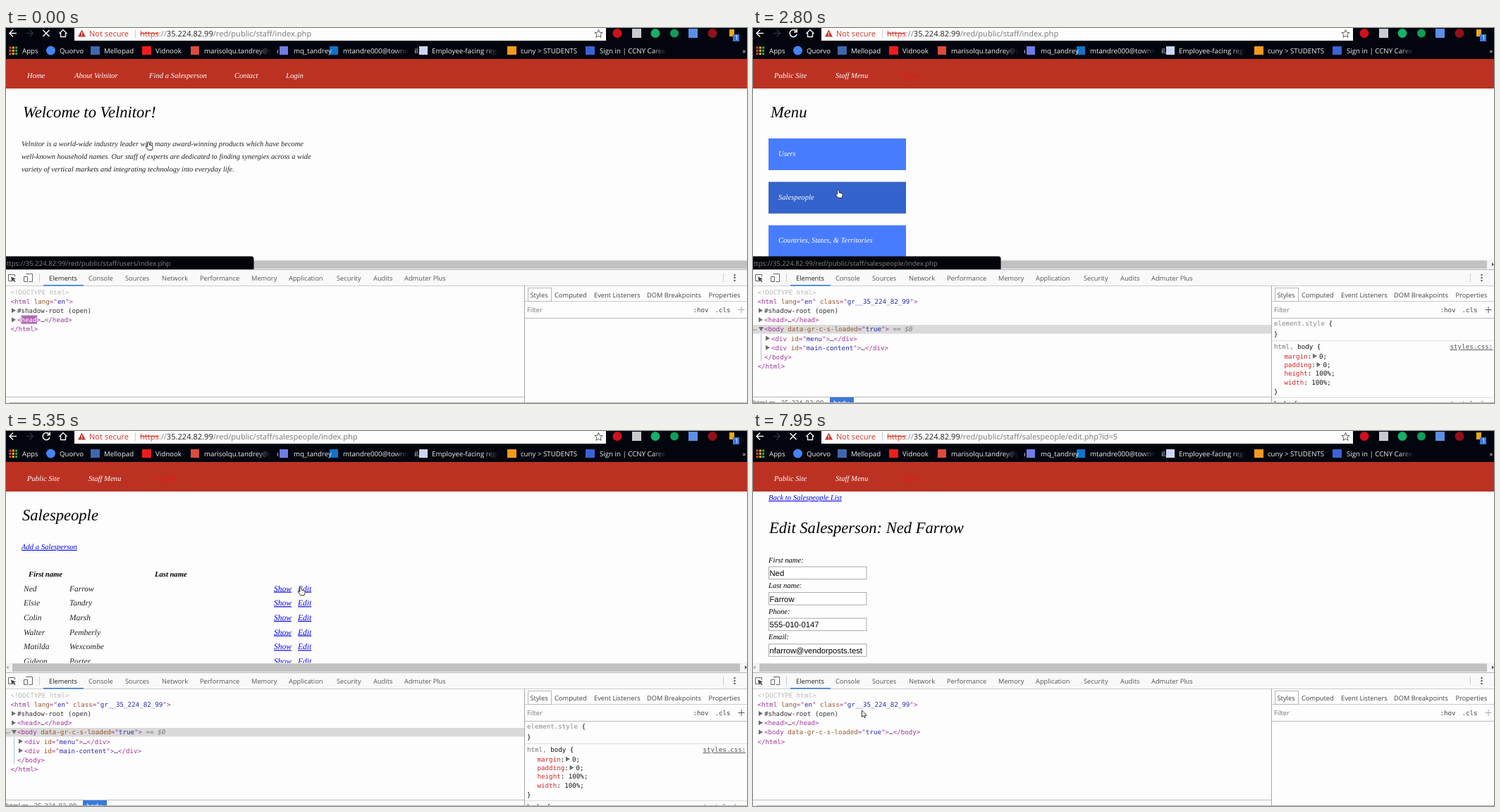
These frames come from a looping animation (1051x533 px, 8 s). An HTML page:

```html
<!DOCTYPE html>
<html lang="en">
<head>
<meta charset="utf-8">
<title>Staff menu walkthrough</title>
<style>
html, body { margin: 0; width: 100%; height: 100%; overflow: hidden; background: #fdfdfd; }
svg { display: block; width: 1051px; height: 533px; }
text { white-space: pre; text-rendering: geometricPrecision; }
.s { font: italic 10.6px "Liberation Serif", serif; }
.p { font-size: 10.4px; }
.r { font-size: 11.5px; }
.b { font-weight: bold; }
.h { font: italic 22.6px "Liberation Serif", serif; }
.w { fill: #fff; }
.l { fill: #00e; text-decoration: underline; }
.u { font: 9.3px "Open Sans", "Noto Sans", sans-serif; }
.k { font: 9.7px "Open Sans", "Noto Sans", sans-serif; fill: #f1f1f1; }
.a { font: 11.1px "Open Sans", "Noto Sans", sans-serif; }
.m { font: 9.2px "DejaVu Sans Mono", monospace; }
.i { font: 11.25px "Liberation Sans", Arial, sans-serif; }
</style>
</head>
<body>
<script>
const NS = 'http://www.w3.org/2000/svg';
function el(tag, attrs, parent) {
  const e = document.createElementNS(NS, tag);
  for (const k in attrs) e.setAttribute(k, attrs[k]);
  parent.appendChild(e);
  return e;
}
const svg = el('svg', { viewBox: '0 0 1051 533', width: 1051, height: 533 }, document.body);
const group = parent => el('g', {}, parent);
const rect = (g, x, y, width, height, fill, more) => el('rect', { x, y, width, height, fill, ...more }, g);
const dot = (g, cx, cy, r, fill) => el('circle', { cx, cy, r, fill }, g);
const path = (g, d, stroke, more) => el('path', { d, stroke, fill: 'none', ...more }, g);
function text(g, x, y, str, cls, fill) {
  const e = el('text', { x, y, class: cls }, g);
  if (fill) e.setAttribute('fill', fill);
  e.textContent = str;
  return e;
}
// The first letter of each part selects its colour.
const inks = { p: '#a0379c', o: '#9a5a2b', b: '#2a2ab0', g: '#b8b8b8', d: '#333', n: '#777',
  r: '#d3262b', w: '#fff', q: '#888', k: '#111' };
function rich(g, x, y, str, cls = 'm') {
  const e = text(g, x, y, '', cls);
  e.textContent = '';
  for (const part of str.split('|'))
    el('tspan', { fill: inks[part[0]] }, e).textContent = part.slice(1);
  return e;
}
const show = (e, on) => e.setAttribute('display', on ? 'inline' : 'none');
const at = (list, t) => list.reduce((v, [start, val]) => t >= start ? val : v, list[0][1]);

// Page views
rect(svg, 0, 0, 1051, 533, '#fdfdfd');
const page = group(svg);
rect(page, 0, 44, 1051, 42, '#bb3223');
const views = {};
for (const name of ['home', 'menu', 'list', 'edit']) views[name] = group(page);
const staffNav = group(page);

const home = views.home;
[[30, 'Home'], [97, 'About Velnitor'], [203, 'Find a Salesperson'], [324, 'Contact'], [397, 'Login']]
  .forEach(([x, s]) => text(home, x, 71, s, 's w'));
text(home, 24, 127, 'Welcome to Velnitor!', 'h');
['Velnitor is a world-wide industry leader with many award-winning products which have become',
  'well-known household names. Our staff of experts are dedicated to finding synergies across a wide',
  'variety of vertical markets and integrating technology into everyday life.']
  .forEach((s, i) => text(home, 22, 168 + 18 * i, s, 's p', '#222'));

text(staffNav, 30, 71, 'Public Site', 's w');
text(staffNav, 117, 71, 'Staff Menu', 's w');
const logout = text(staffNav, 210, 71, 'Logout', 's', '#ee1414');

text(views.menu, 25, 127, 'Menu', 'h');
const buttons = ['Users', 'Salespeople', 'Countries, States, & Territories'].map((s, i) => {
  const y = 157 + 61.7 * i, b = rect(views.menu, 22, y, 195, 45, '#487cff');
  text(views.menu, 36, y + 25, s, 's w');
  return b;
});

const list = views.list;
text(list, 23, 127, 'Salespeople', 'h');
text(list, 22, 168, 'Add a Salesperson', 's l');
text(list, 32, 206.5, 'First name', 's b');
text(list, 211, 206.5, 'Last name', 's b');
['Ned Farrow', 'Elsie Tandry', 'Colin Marsh', 'Walter Pemberly', 'Matilda Wexcombe', 'Gideon Porter']
  .forEach((s, i) => {
    const y = 227.5 + 20.7 * i, [first, last] = s.split(' ');
    text(list, 25, y, first, 's r', '#222');
    text(list, 90, y, last, 's r', '#222');
    text(list, 380, y, 'Show', 's r l');
    text(list, 414, y, 'Edit', 's r l');
  });

const edit = views.edit;
text(edit, 22, 98, 'Back to Salespeople List', 's l');
text(edit, 23, 145, 'Edit Salesperson: Ned Farrow', 'h');
[['First name:', 'Ned'], ['Last name:', 'Farrow'], ['Phone:', '555-010-0147'],
  ['Email:', 'nfarrow@vendorposts.test']].forEach(([label, val], i) => {
  const y = 36.6 * i;
  text(edit, 22, 186.5 + y, label, 's');
  rect(edit, 22.5, 193 + y, 138.5, 17.5, '#fff', { stroke: '#a9a9a9' });
  text(edit, 23.5, 206 + y, val, 'i');
});

// Horizontal scrollbar
rect(svg, 0, 329.5, 1051, 13.5, '#f4f4f4');
const thumb = rect(svg, 9, 330.5, 1032, 11.5, '#c1c1c1');
path(svg, 'M3.5 333.5v5l-3-2.5z', 'none', { fill: '#a3a3a3' });
const rightArrow = path(svg, 'M1048 333.5v5l3-2.5z', 'none', { fill: '#505050' });

// Browser frame
const bar = group(svg);
rect(bar, 0, 0, 1051, 44, '#02050d');
rect(bar, 97, 0, 754, 18, '#fdfdfd');
const white = { 'stroke-width': 1.6 };
path(bar, 'M15 7.5H5.5M10 2.5l-5 5 5 5', '#eee', white);
path(bar, 'M28.5 7.5H38M33.5 2.5l5 5-5 5', '#2b2e36', white);
const stopIcon = path(bar, 'M52.5 3l9 9M61.5 3l-9 9', '#f5f5f5', white);
const reloadIcon = path(bar, 'M61.5 5A5 5 0 1 0 62 9M62.2 1.5V5.7H58', '#f5f5f5', white);
path(bar, 'M75.5 8l5.5-5.5L86.500 8M77.500 7v5.5h7V7', '#f5f5f5', { 'stroke-width': 1.4 });
path(bar, 'M107.500 2.500l5.5 10h-11z', 'none', { fill: '#c9362b' });
path(bar, 'M107.500 6v3.500M107.500 10.200v1.300', '#fff', { 'stroke-width': 1.1 });
text(bar, 118, 11.5, 'Not secure', 'a', '#c9362b');
rect(bar, 183, 2, 1, 12, '#ccc');
const addr = text(bar, 190, 11.5, '', 'a');
const scheme = el('tspan', { fill: '#d23f31', 'text-decoration': 'line-through' }, addr);
scheme.textContent = 'https';
el('tspan', { fill: '#888' }, addr).textContent = '://';
el('tspan', { fill: '#222' }, addr).textContent = '35.224.82.99';
const addrPath = el('tspan', { fill: '#777' }, addr);
path(bar, 'M840.500 2.500l1.600 3.700 4 .4-3 2.700.9 4-3.500-2.100-3.500 2.100.9-4-3-2.700 4-.4z', '#555');

dot(bar, 867, 7.5, 6.5, '#d0101f');
rect(bar, 888, 1, 13, 13, '#c9cbd0');
dot(bar, 921, 7.5, 6.5, '#15b06a');
dot(bar, 948, 7.5, 6, '#0f9d58');
rect(bar, 968, 1, 13, 13, '#5b8fe8');
dot(bar, 1002, 7.5, 6.5, '#93101a');
rect(bar, 1026, 2, 7, 10, '#e8a81c');
rect(bar, 1031, 9, 9, 10, '#3a78e0');
text(bar, 1033.5, 17, '1', 'u', '#fff').setAttribute('font-size', 8);

const appInks = ['#ea4335', '#fbbc05', '#34a853', '#4285f4'];
for (let i = 0; i < 9; i++)
  rect(bar, 4.5 + i % 3 * 4.3, 26.5 + (i / 3 | 0) * 4.3, 3, 3, appInks[(i + (i / 3 | 0)) % 4]);
dot(bar, 63.5, 32, 6.5, '#4285f4');
[[120, 13, '#3f66b0'], [193, 13, '#f01c1c'], [262, 12, '#dd4b3e'], [388, 12, '#6f7be8'], [459, 12, '#1173c9'],
  [586, 12, '#c9d7f2'], [711, 13, '#f59a1b'], [822, 13, '#3b62d6']]
  .forEach(([x, w, c]) => rect(bar, x, 26, w, 12, c));
[[23, 'Apps'], [76, 'Quorvo'], [139, 'Mellopad'], [212, 'Vidnook'], [281, 'marisolqu.tandrey@gm'], [408, 'mq_tandrey'],
  [478, 'mtandre000@townmail.'], [604, 'Employee-facing regi'], [730, 'cuny > STUDENTS'],
  [842, 'Sign in | CCNY Career'], [1044.5, '»']].forEach(([x, s]) => text(bar, x, 35.5, s, 'k'));
const fade = el('linearGradient', { id: 'fade' }, el('defs', {}, svg));
[0, 1].forEach(o => el('stop', { offset: o, 'stop-color': '#02050d', 'stop-opacity': o }, fade));
[376, 571, 698, 937].forEach(x => {
  rect(bar, x - 20, 22, 20, 21, 'url(#fade)');
  rect(bar, x, 22, 9, 21, '#02050d');
});

// Developer tools
const tools = group(svg);
rect(tools, 0, 343, 1051, 190, '#fdfdfd');
rect(tools, 0, 343, 1051, 23, '#f9f9f9');
rect(tools, 0, 343, 1051, 1, '#b5b5b5');
rect(tools, 0, 366, 1051, 1, '#ccc');
path(tools, 'M8 359.500H3.500V350.500h9v3', '#666');
path(tools, 'M7 353.500l7 3-3 1 2.500 2.500-1.200 1.200-2.500-2.500-1.300 2.300z', 'none', { fill: '#444' });
path(tools, 'M28.500 349.500h9v11h-5M25.500 353.500h5v7h-5z', '#666');
rect(tools, 47, 349, 1, 12, '#ccc');
rect(tools, 1017, 349, 1, 12, '#ccc');
[351, 355, 359].forEach(y => dot(tools, 1033.5, y, 1.2, '#555'));
[[61, 'Elements'], [117, 'Console'], [169, 'Sources'], [221, 'Network'], [275, 'Performance'], [348, 'Memory'],
  [401, 'Application'], [469, 'Security'], [521, 'Audits'], [565, 'Admuter Plus']]
  .forEach(([x, s], i) => text(tools, x, 358.8, s, 'u', i ? '#555' : '#222'));
rect(tools, 53, 365, 57, 1.6, '#3b7de0');
rect(tools, 0, 524, 735, 1, '#bbb');
rect(tools, 735, 366, 1, 167, '#a5a5a5');
rect(tools, 736, 388, 315, 1, '#ccc');
rect(tools, 740.5, 369.5, 33, 19, '#fff', { stroke: '#b5b5b5' });
[[743.5, 'Styles'], [778, 'Computed'], [834, 'Event Listeners'], [909, 'DOM Breakpoints'], [996.5, 'Properties']]
  .forEach(([x, s]) => text(tools, x, 382.7, s, 'u', '#444'));
text(tools, 739, 404, 'Filter', 'u', '#777');
text(tools, 974.5, 403.5, ':hov', 'm b', '#444');
text(tools, 1005.5, 403.5, '.cls', 'm b', '#444');
const plus = path(tools, 'M1038.500 400.500h9M1043 396v9', '#aaa');
rect(tools, 736, 412, 315, 1, '#bbb');

// Element tree
const tree = {};
for (const name of ['loadHi', 'load', 'closed', 'open']) tree[name] = group(tools);
const tri = (g, x, y) => path(g, `M${x} ${y - 3.5}v7l6-3.5z`, 'none', { fill: '#6e6e6e' });
const triDown = (g, x, y) => path(g, `M${x} ${y - 3}h7l-3.500 6z`, 'none', { fill: '#6e6e6e' });
const row = i => 378.8 + 13.15 * i;
const line = (g, i, x, str) => rich(g, x, row(i), str);
const bodyTag = 'p<body |odata-gr-c-s-loaded|p="|btrue|p">';
for (const name in tree) {
  const g = tree[name], loading = name.startsWith('load'), hot = name === 'loadHi';
  if (name === 'open') rect(g, 0, 422, 735, 12.5, '#dadada');
  line(g, 0, 6.5, 'g<!DOCTYPE html>');
  line(g, 1, 6.5, 'p<html |olang|p="|ben|p"' + (loading ? '>' : ' |oclass|p="|bgr__35_224_82_99|p">'));
  tri(g, 8, row(2) - 3.5);
  line(g, 2, 16, 'd#shadow-root (open)');
  tri(g, 8, row(3) - 3.5);
  if (hot) rect(g, 21.500, 408.5, 22.500, 12, '#b067b5');
  line(g, 3, 16, `p<|${hot ? 'w' : 'p'}head|p>|d…|p</head>`);
  if (loading) line(g, 4, 6.5, 'p</html>');
  else if (name === 'closed') {
    tri(g, 8, row(4) - 3.5);
    line(g, 4, 16, bodyTag + '|d…|p</body>');
    line(g, 5, 6.5, 'p</html>');
  }
}
const open = tree.open;
dot(open, 1.5, 429, .8, '#666');
dot(open, 4.5, 429, .8, '#666');
triDown(open, 8, row(4) - 3.5);
line(open, 4, 16, bodyTag + '|n == ').appendChild(el('tspan', { fill: '#777', 'font-style': 'italic' }, open)).textContent = '$0';
rect(open, 11, 435, 1, 38, '#a9c3dd');
['menu', 'main-content'].forEach((id, i) => {
  tri(open, 18, row(5 + i) - 3.5);
  line(open, 5 + i, 26, `p<div |oid|p="|b${id}|p">|d…|p</div>`);
});
line(open, 7, 16, 'p</body>');
line(open, 8, 6.5, 'p</html>');
text(open, 0, 535.5, 'html.gr__35_224_82_99', 'u', '#444');
rect(open, 109, 525, 34, 8, '#3879d9');
text(open, 114, 535.5, 'body', 'u', '#fff');

// Style rules
rich(open, 739, 423, 'qelement.style |k{');
rich(open, 739, 438, 'k}');
rect(open, 736, 444, 315, 1, '#ddd');
rich(open, 739, 456, 'nhtml, |kbody {');
text(open, 988.5, 456, 'styles.css:', 'm', '#555').setAttribute('text-decoration', 'underline');
['margin', 'padding', 'height', 'width'].forEach((s, i) => {
  const y = 469.500 + 12.4 * i;
  if (i > 1) rich(open, 753.5, y, `r${s}|k: 100%;`);
  else {
    rich(open, 753.5, y, `r${s}|k:`);
    tri(open, 794 + 5.5 * i, y - 3.3);
    rich(open, 803 + 5.5 * i, y, 'k0;');
  }
});
rich(open, 739, 519.5, 'k}');
rect(open, 736, 525, 315, 1, '#ddd');
rich(open, 739, 536.5, 'kbody {');
text(open, 939, 536.5, 'user agent stylesheet', 'm', '#777').setAttribute('font-style', 'italic');
rect(svg, 5, 532, 1046, 1, '#b5b5b5');

// Link address bubble
const bubble = group(svg);
path(bubble, 'M0 324.500H348q3.500 0 3.500 3.500V343H0z', 'none', { fill: '#02040a' });
const bubbleText = text(bubble, -5, 337.5, '', 'u', '#858585');
bubbleText.style.fontSize = '9.6px';

// Pointers, tip at the local origin
const hand = path(svg, 'M-1.300 .8q1.300-1.600 2.400 0V4l4.300 1.200q1 .5 .8 2L5 11.500H-.2L-3.700 7q-.2-1.600 1.400-1.100l1 .9z',
  '#222', { fill: '#fff', 'stroke-width': .9 });
const arrow = path(svg, 'M0 0v9.500l2.200-2 1.500 3.200 1.500-.7-1.500-3h3z', '#222', { fill: '#fff', 'stroke-width': .9 });

// Timeline
const LOOP = 8000, base = '/red/public/staff/', host = 'https://35.224.82.99';
const COOL = '#487cff', WARM = '#3f70e0', HOT = '#3563cc';
const pages = [[0, 'home'], [700, 'menu'], [3790, 'list'], [6800, 'edit']];
const trees = [[0, 'loadHi'], [150, 'load'], [290, ''], [990, 'loadHi'], [1150, 'load'], [1290, 'closed'], [1430, 'open'],
  [3370, ''], [3930, 'loadHi'], [4060, 'load'], [4810, 'closed'], [4950, 'open'], [6090, ''],
  [6950, 'loadHi'], [7090, 'load'], [7950, 'closed']];
const busy = [[0, true], [1430, false], [2950, true], [4950, false], [5940, true]];
const urls = [[0, 'index.php'], [3370, 'salespeople/index.php'], [6090, 'salespeople/edit.php?id=5']];
const hints = [[0, 'users/index.php'], [2120, 'salespeople/index.php'], [3510, ''],
  [5500, 'salespeople/edit.php?id=5'], [6520, '']];
const userInk = [[0, WARM], [990, HOT], [2120, WARM], [2240, COOL]];
const salesInk = [[0, COOL], [2120, WARM], [2240, HOT], [3510, WARM]];
// start, end, steps, target x, target y
const moves = [[290, 840, 5, 138.5, 248], [990, 1150, 2, 130, 182], [2000, 2360, 4, 121, 230],
  [4810, 5350, 5, 418, 222], [6950, 7530, 5, 154.5, 397]];

function pointer(t) {
  let x = 202, y = 162;
  for (const [a, b, n, tx, ty] of moves) {
    if (t < a) break;
    const k = t >= b ? 1 : (Math.floor((t - a) / (b - a) * (n - 1)) + 1) / n;
    x += (tx - x) * k;
    y += (ty - y) * k;
  }
  return [x, y];
}

function draw(t) {
  const view = at(pages, t), dom = at(trees, t), hint = at(hints, t), loading = at(busy, t);
  for (const k in views) show(views[k], k === view);
  for (const k in tree) show(tree[k], k === dom);
  show(staffNav, view !== 'home');
  logout.setAttribute('opacity', t < 990 ? .5 : .85);
  buttons[0].setAttribute('fill', at(userInk, t));
  buttons[1].setAttribute('fill', at(salesInk, t));
  thumb.setAttribute('width', view === 'home' ? 1042 : 1032);
  show(rightArrow, view !== 'home');
  show(stopIcon, loading);
  show(reloadIcon, !loading);
  plus.setAttribute('stroke', dom === 'open' ? '#555' : '#aaa');
  addrPath.textContent = base + at(urls, t);
  show(bubble, hint);
  bubble.setAttribute('opacity', t >= 6370 ? .5 : 1);
  bubbleText.textContent = host + base + hint;
  const [x, y] = pointer(t), away = t >= 4060 && t < 5210 || t >= 6800;
  for (const c of [hand, arrow]) c.setAttribute('transform', `translate(${x} ${y})`);
  show(hand, !away);
  show(arrow, away);
}

const begin = performance.now();
function tick() {
  draw((performance.now() - begin) % LOOP);
  requestAnimationFrame(tick);
}
draw(0);
requestAnimationFrame(tick);
</script>
</body>
</html>
```
